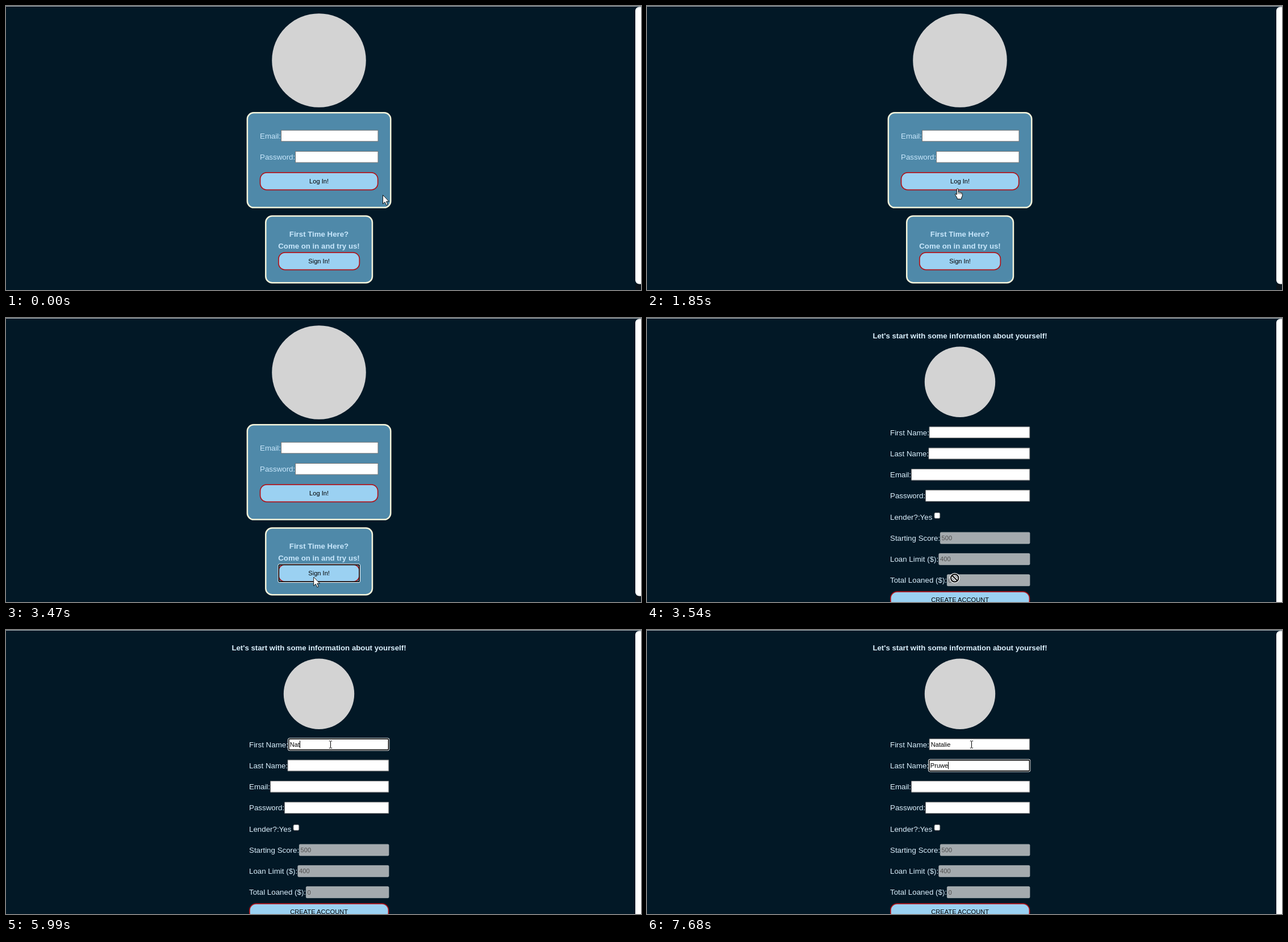
Recreate the animation shown at these times as an HTML page. Size 1118 by 501 pixels, loop 8 s.

```html
<!DOCTYPE html>
<html lang="en">
<head>
<meta charset="utf-8">
<title>Sign up</title>
<style>
  html, body { margin: 0; width: 100%; height: 100%; overflow: hidden; background: #021826; }
  svg { display: block; width: 1118px; height: 501px; }
  text { font: 13.333px "Liberation Sans", Arial, sans-serif; fill: #dcf0fd; white-space: pre; }
  .soft { fill: #c8e7fc; }
  .bold { font-weight: bold; font-size: 13.25px; }
  .small { font-size: 11.111px; fill: #000; }
  .off { font-size: 11.111px; fill: #4e4e4e; }
  .mid { text-anchor: middle; }
</style>
</head>
<body>
<svg id="stage" viewBox="0 0 1118 501"></svg>
<script>
const LOOP = 8000, SUBMIT = 3390, PAGE2 = 3540;
const stage = document.getElementById('stage');

// Markup helpers; boxes are given by their outer edges.
const box = (x, y, r, b, fill, line = 'none', w = 0, rad = 0, extra = '') =>
  `<rect x="${x + w / 2}" y="${y + w / 2}" width="${r - x - w}" height="${b - y - w}" rx="${rad}" fill="${fill}" stroke="${line}" stroke-width="${w}" ${extra}/>`;
const text = (x, y, str, cls = '') => `<text x="${x}" y="${y}" class="${cls}">${str}</text>`;
const button = (x, y, r, b, str) =>
  box(x, y, r, b, '#9bd1f2', '#b01218', 1.7, 11.6) + text((x + r) / 2, (y + b) / 2 + 4, str, 'small mid');
const panel = (x, y, r, b) => box(x, y, r, b, '#4f89a9', '#f5f5dc', 2.5, 11.2);
const badge = (y, r) => `<circle cx="551" cy="${y}" r="${r}" fill="#d3d3d3"/>`;
const ring = (id, x, y, r, b) => `<g id="${id}">` +
  box(x - 1, y - 1, r + 1, b + 1, 'none', '#fff', 1, 2.5) +
  box(x, y, r, b, 'none', '#101010', 1.7, 1.5) + '</g>';

const rowY = i => 201.7 + 37.27 * i;
const rows = [
  ['First Name:', 496.5], ['Last Name:', 495.5], ['Email:', 465], ['Password:', 490],
  ['Lender?:Yes'], ['Starting Score:', 516, 500], ['Loan Limit ($):', 513.5, 400], ['Total Loaned ($):', 528, 0]
];

function formRow([label, x, value], i) {
  const y = rowY(i), name = text(428, y + 4.8, label);
  if (!x) return name + box(505.5, y - 7.7, 516.3, y + 3.1, '#fff', '#767676', 1, 2);
  if (value === undefined) return name + box(x, y - 10.3, 674.3, y + 10.4, '#fff', '#767676', 1, 0.5, `id="field${i}"`);
  return name + box(x, y - 10.3, 674.3, y + 10.4, '#a4aaae', '#b4babd', 0.8, 1.5) + text(x + 2.6, y + 4, value, 'off');
}

const loginPage = badge(96, 82.8) +
  panel(423.6, 187, 678.5, 356.8) +
  text(447, 233.8, 'Email:', 'soft') + box(484, 218.7, 655.5, 239.3, '#fff', '#767676', 1) +
  text(447, 271, 'Password:', 'soft') + box(509, 256, 655.5, 276.6, '#fff', '#767676', 1) +
  button(446.7, 293, 655.5, 325.2, 'Log In!') +
  panel(456, 369.3, 646.2, 489.5) +
  text(551, 407.4, 'First Time Here?', 'soft bold mid') +
  text(551, 428.2, 'Come on in and try us!', 'soft bold mid') +
  button(479, 434, 623.2, 466.2, 'Sign In!') +
  ring('press', 479.5, 434.5, 623, 466) +
  box(1108, 490, 1118, 501, '#0a141c') + box(1108, 1.5, 1130, 490.5, '#fff', 'none', 0, 7);

const formPage = text(551, 36.3, "Let's start with some information about yourself!", 'bold mid') +
  badge(112.7, 62.2) + rows.map(formRow).join('') +
  button(428, 482, 674.3, 511, 'CREATE ACCOUNT') +
  ring('focus0', 497, 191.4, 674.3, 212.2) + ring('focus1', 496, 228.7, 674.3, 249.5) +
  text(499.8, 205.8, '', 'small typed') + text(498.8, 243, '', 'small typed') +
  '<rect id="caret" width="1" height="13"/>' +
  box(1108, 1.5, 1130, 520, '#fff', 'none', 0, 7);

// Cursor shapes with the hot spot at 0,0.
const cursors = {
  arrow: '<path d="M0 0V15.5L3.6 12.2L6.2 18L8.6 17L6.1 11.3H10.8Z" fill="#fff" stroke="#000" stroke-width=".9"/>',
  hand: '<path d="M-1.4 1.2Q0 -.6 1.4 1.2V6.5Q3 5.6 4 7Q5.7 6.4 6.3 8Q8.4 7.5 8.5 9.8V13.5L7 16.3V18.8H-.6V16.8L-4 11.5Q-4.4 9.3 -2.8 9.8L-1.4 11.2Z" fill="#fff" stroke="#000" stroke-width=".95"/><path d="M1.4 6.5V10M4 7.5V10.2M6.3 8.5V10.6" fill="none" stroke="#000" stroke-width=".8"/>',
  beam: '<path d="M-2.7 -6.2H-.8L0 -5.6L.8 -6.2H2.7M0 -5.6V5.6M-2.7 6.2H-.8L0 5.6L.8 6.2H2.7" fill="none" stroke="#000" stroke-width="1"/>',
  deny: '<circle r="7" fill="none" stroke="#fff" stroke-width="4"/><path d="M-4.7 -4.7L4.7 4.7" stroke="#fff" stroke-width="4"/><circle r="6.7" fill="none" stroke="#000" stroke-width="2"/><path d="M-4.7 -4.7L4.7 4.7" stroke="#000" stroke-width="2"/>'
};

stage.innerHTML = '<rect width="1118" height="501" fill="#021826"/>' +
  `<g id="login">${loginPage}</g><g id="form">${formPage}</g>` +
  '<rect width="1118" height="1" fill="#aeb5ba"/>' +
  '<g id="pointer">' + Object.entries(cursors).map(([k, d]) => `<g id="${k}">${d}</g>`).join('') + '</g>';

const el = id => document.getElementById(id);
const show = (id, on) => { el(id).style.display = on ? '' : 'none'; };
const typed = stage.querySelectorAll('.typed');

// Each run: start, step length, then the points the pointer jumps through.
const runs = [
  [0, 1, [[663.5, 333.5]]],
  [1020, 95, [[652, 305], [625, 270], [585, 250], [535, 262], [490, 300], [455, 350], [430, 392], [408, 404], [394, 390]]],
  [1850, 88, [[546.7, 321.7], [612, 345], [619, 382], [603, 415], [582, 436], [565, 447], [553, 453], [546, 456], [543, 456.5], [542, 456.5]]],
  [2730, 1, [[541.7, 457]]],
  [PAGE2, 1, [[541.7, 458.7]]],
  [3970, 85, [[540, 395], [507, 270], [575, 179]]],
  [4300, 90, [[574, 187], [573, 196], [572, 200], [571.5, 202]]]
];

function pointerAt(t) {
  const [start, step, pts] = runs.filter(run => t >= run[0]).pop();
  return pts[Math.min(pts.length - 1, Math.floor((t - start) / step))];
}

const inside = (x, y, l, t, r, b) => x >= l && x <= r && y >= t && y <= b;

function cursorFor(x, y, t) {
  if (t < PAGE2) {
    if (t >= SUBMIT + 75) return 'arrow';
    if (inside(x, y, 447, 293, 655, 325) || inside(x, y, 479, 434, 623, 466)) return 'hand';
    return inside(x, y, 484, 219, 655, 240) || inside(x, y, 509, 256, 655, 277) ? 'beam' : 'arrow';
  }
  const row = rows.find((r, i) => r[1] && inside(x, y, r[1], rowY(i) - 10.3, 674, rowY(i) + 10.5));
  return !row ? 'arrow' : row[2] === undefined ? 'beam' : 'deny';
}

const names = ['Natalie', 'Pruwe'];
const keys = [
  [5630, 5810, 5990, 6080, 6170, 6270, 6360],
  [7230, 7410, 7500, 7590, 7680]
];
const focusTimes = [4820, 6790];

function render(t) {
  show('login', t < PAGE2);
  show('form', t >= PAGE2);
  show('press', t >= SUBMIT);

  const [x, y] = pointerAt(t), kind = cursorFor(x, y, t);
  el('pointer').setAttribute('transform', `translate(${x} ${y})`);
  for (const k in cursors) show(k, k === kind);

  const hover = t >= PAGE2 && kind === 'beam';
  for (let i = 0; i < 4; i++)
    el('field' + i).setAttribute('stroke', hover && Math.abs(y - rowY(i)) < 11 ? '#4f4f4f' : '#767676');

  const active = focusTimes.filter(f => t >= f).length - 1;
  names.forEach((name, i) => {
    show('focus' + i, i === active);
    typed[i].textContent = name.slice(0, keys[i].filter(k => t >= k).length);
  });
  if (active < 0) return show('caret', false);

  // The caret blinks from the last key press or focus change.
  const last = Math.max(focusTimes[active], ...keys[active].filter(k => t >= k));
  show('caret', (t - last) % 1060 < 530);
  const field = typed[active];
  const width = field.textContent ? field.getComputedTextLength() : 0;
  el('caret').setAttribute('x', Math.round(+field.getAttribute('x') + width));
  el('caret').setAttribute('y', active ? 232.5 : 195);
}

const begin = performance.now();
function tick() {
  render((performance.now() - begin) % LOOP);
  requestAnimationFrame(tick);
}
tick();
</script>
</body>
</html>
```
